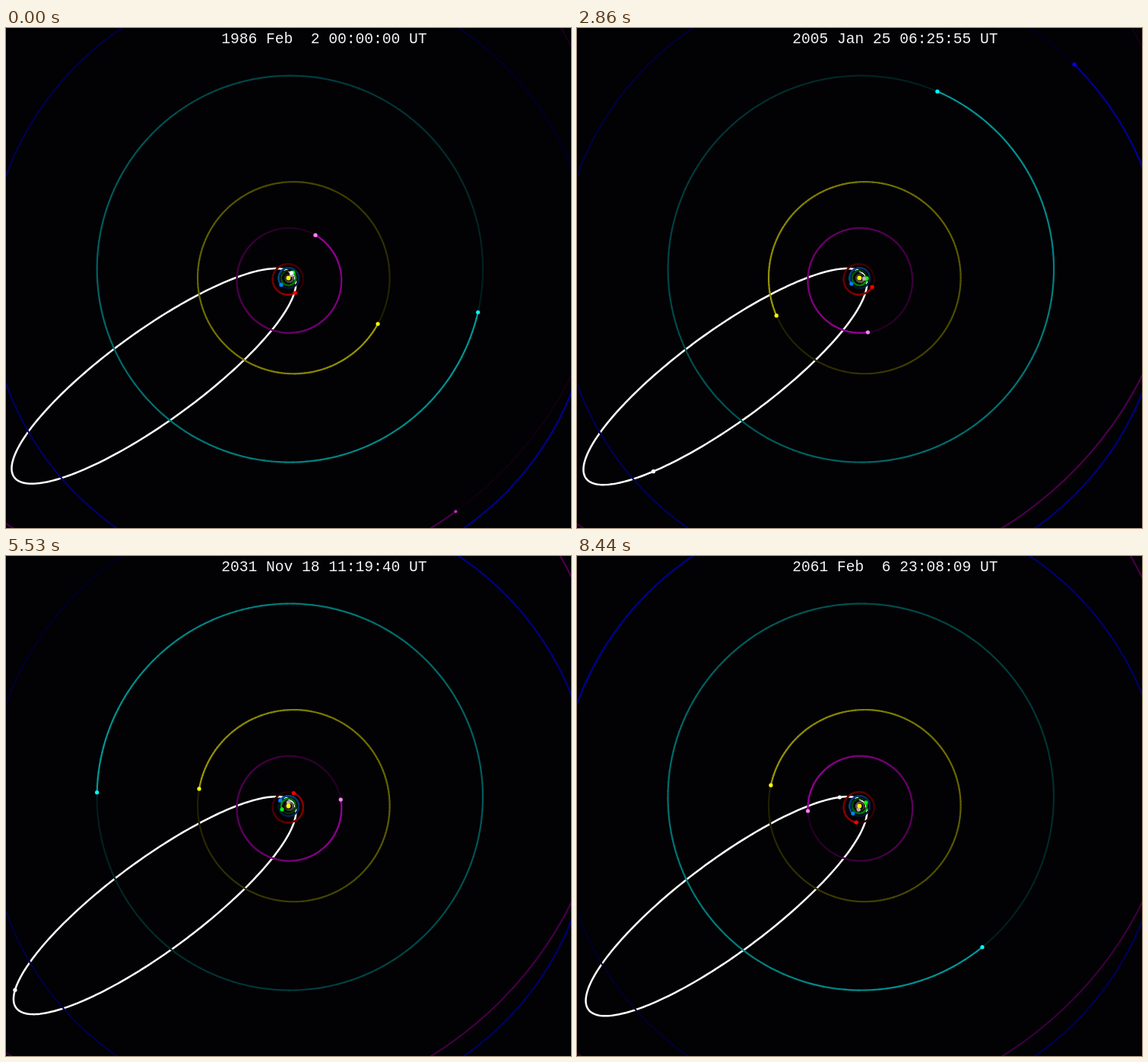
Recreate the animation shown at these times as an HTML page with a canvas. Size 743x657 px, loop 9440 ms.

```html
<!DOCTYPE html>
<html lang="en">
<head>
<meta charset="utf-8">
<title>Comet orbit, 1986 to 2061</title>
<style>
  html, body { margin: 0; width: 100%; height: 100%; overflow: hidden; background: #020104; }
  canvas { display: block; }
  #date {
    position: absolute; left: 283.2px; top: 3px; white-space: pre;
    font: 19.6px/24px "Liberation Mono", "Courier New", monospace; color: #f4f4f4;
  }
</style>
</head>
<body>
<canvas id="sky" width="743" height="657"></canvas>
<div id="date"></div>
<script>
const ctx = document.getElementById('sky').getContext('2d');
const dateLabel = document.getElementById('date');

const TAU = 2 * Math.PI, RAD = Math.PI / 180;
const SUN = { x: 371.5, y: 328.5 }, PIXELS_PER_AU = 13.25;
const HOLD = 1000, STEP = 30, LAST = 249, LOOP = 9440;
const START = Date.UTC(1986, 1, 2), J2000 = Date.UTC(2000, 0, 1, 12);
const DAY = 86400000, DAYS_PER_STEP = 110.036;
const EARTH_MOTION = 35999.37, PRECESSION = 1.25;   // degrees per century

// a: semi-major axis in AU, e: eccentricity, lon: mean longitude at J2000,
// peri: longitude of perihelion; orbits are flat unless tilted about a node
const planets = [
  { name: 'Pluto', a: 39.48, e: 0.249, lon: 239.05, peri: 224.07, tilt: 17.14, node: 110.3,
    hue: 300, light: 25, dotLight: 45, sat: 60, size: 2.1 },
  { name: 'Neptune', a: 30.05, e: 0.0086, lon: 304.65, peri: 45, hue: 240 },
  { name: 'Uranus', a: 19.17, e: 0.0473, lon: 314.2, peri: 171, hue: 180 },
  { name: 'Saturn', a: 9.53, e: 0.0539, lon: 50.08, peri: 92.6, hue: 60 },
  { name: 'Jupiter', a: 5.2, e: 0.0484, lon: 34.27, peri: 14.7, hue: 300, dotLight: 75 },
  { name: 'Mars', a: 1.52368, e: 0.0934, lon: 355.43, peri: 336, hue: 0 },
  { name: 'Earth', a: 1, e: 0.0167, lon: 100.46, peri: 103, hue: 210 },
  { name: 'Venus', a: 0.72333, lon: 181.98, hue: 120 },
  { name: 'Mercury', a: 0.3871, e: 0.2056, lon: 252.25, peri: 77.5, hue: 0, sat: 5, light: 70 },
].map(withDefaults);
const comet = withDefaults({ name: 'Comet', a: 17.834, e: 0.967, lon: 236.23, peri: 169.83,
                             tilt: 162.26, node: 58.5, light: 100 });

function withDefaults(b) {
  return { e: 0, peri: 0, tilt: 0, node: 0, hue: 0, sat: 100, light: 50, size: 2.6, ...b };
}

const color = (b, lightness) => `hsl(${b.hue}, ${b.sat}%, ${lightness}%)`;

// Kepler's third law gives the mean motion
const meanAnomaly = (b, century) =>
  (b.lon - b.peri + EARTH_MOTION * b.a ** -1.5 * century) * RAD;

function eccentricAnomaly(M, e) {
  M = ((M % TAU) + TAU) % TAU;
  let E = Math.PI;
  for (let i = 0; i < 10; i++) E -= (E - e * Math.sin(E) - M) / (1 - e * Math.cos(E));
  return E;
}

function rotate([x, y], degrees) {
  const c = Math.cos(degrees * RAD), s = Math.sin(degrees * RAD);
  return [x * c - y * s, x * s + y * c];
}

// Seen from ecliptic north, with the vernal equinox pointing up
function pointAt(b, E, century) {
  const inPlane = [b.a * (Math.cos(E) - b.e), b.a * Math.sqrt(1 - b.e ** 2) * Math.sin(E)];
  const [along, across] = rotate(inPlane, b.peri - b.node);
  const flat = [along, across * Math.cos(b.tilt * RAD)];
  const [X, Y] = rotate(flat, b.node + PRECESSION * century);
  return [SUN.x - PIXELS_PER_AU * Y, SUN.y - PIXELS_PER_AU * X];
}

const position = (b, M, century) => pointAt(b, eccentricAnomaly(M, b.e), century);

function drawDot([x, y], fill, radius) {
  ctx.fillStyle = fill;
  ctx.beginPath();
  ctx.arc(x, y, radius, 0, TAU);
  ctx.fill();
}

function drawCometOrbit(century) {
  ctx.strokeStyle = '#fff';
  ctx.lineWidth = 2.5;
  ctx.beginPath();
  for (let i = 0; i < 240; i++) ctx.lineTo(...pointAt(comet, TAU * i / 240, century));
  ctx.closePath();
  ctx.stroke();
}

// One revolution of trail, fading with age
function drawTrail(b, century) {
  const segments = 180, M = meanAnomaly(b, century);
  ctx.lineWidth = 2.2;
  let from = position(b, M - TAU, century);
  for (let i = segments - 1; i >= 0; i--) {
    const age = i / segments;
    const to = position(b, M - TAU * age, century);
    ctx.strokeStyle = color({ ...b, sat: b.sat === 60 ? 100 : b.sat }, b.light * (0.6 - 0.49 * age));
    ctx.beginPath();
    ctx.moveTo(...from);
    ctx.lineTo(...to);
    ctx.stroke();
    from = to;
  }
}

function formatDate(ms) {
  const date = new Date(ms);
  const month = date.toLocaleString('en-US', { month: 'short', timeZone: 'UTC' });
  const day = String(date.getUTCDate()).padStart(2);
  return `${date.getUTCFullYear()} ${month} ${day} ${date.toISOString().slice(11, 19)} UT`;
}

function draw(step) {
  const now = START + Math.round(step * DAYS_PER_STEP * DAY);
  const century = (now - J2000) / DAY / 36525;
  ctx.fillStyle = '#020104';
  ctx.fillRect(0, 0, 743, 657);
  ctx.lineCap = ctx.lineJoin = 'round';
  drawCometOrbit(century);
  for (const p of planets) drawTrail(p, century);
  for (const b of [...planets, comet]) {
    const place = position(b, meanAnomaly(b, century), century);
    drawDot(place, color(b, b.dotLight ?? b.light), b.size);
  }
  drawDot([SUN.x, SUN.y], '#ff0', 2.9);
  dateLabel.textContent = formatDate(now);
}

const startTime = performance.now();
let shown = -1;
function tick() {
  const t = (performance.now() - startTime) % LOOP;
  const step = t < HOLD ? 0 : Math.min(LAST, Math.floor((t - HOLD) / STEP) + 1);
  if (step !== shown) draw(shown = step);
  requestAnimationFrame(tick);
}
tick();
</script>
</body>
</html>
```
